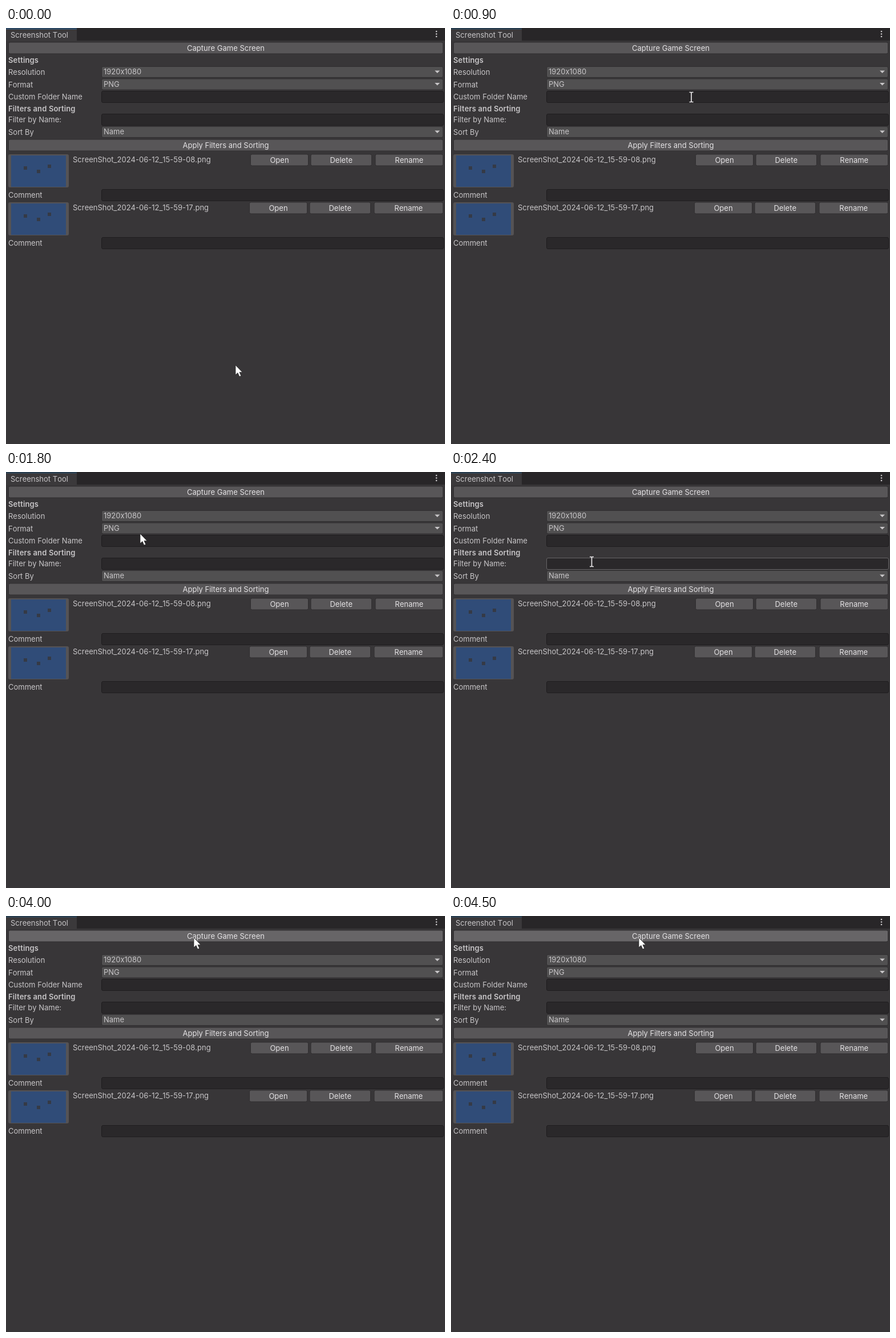
Animation of 769 by 728 pixels, one loop 5000 ms. Source, as an HTML page:

```html
<!DOCTYPE html>
<html lang="en">
<head>
<meta charset="utf-8">
<title>Screenshot Tool</title>
<style>
html, body { margin: 0; width: 100%; height: 100%; overflow: hidden; background: #383638; }
svg {
  display: block; font: 13px Inter, "Open Sans", sans-serif; fill: #c8c6c8;
  font-kerning: none; font-feature-settings: "calt" 0;
}
.button { fill: #585658; stroke: #302e30; }
.button.hover { fill: #676567; }
.button.pressed { fill: #46607c; }
.dropdown { fill: #515051; stroke: #302e30; }
.field { fill: #2a282a; stroke: #1f1d1f; }
.field.hover { stroke: #656365; }
.caption { fill: #e4e2e4; text-anchor: middle; }
.bold { font-weight: 600; letter-spacing: .15px; }
</style>
</head>
<body>
<svg id="stage" width="769" height="728" viewBox="0 0 769 728"></svg>
<script>
const stage = document.getElementById('stage');

function add(tag, attrs, text = '') {
  const node = document.createElementNS('http://www.w3.org/2000/svg', tag);
  for (const name in attrs) node.setAttribute(name, attrs[name]);
  node.textContent = text;
  return stage.appendChild(node);
}

const rect = (x, y, width, height, fill) => add('rect', { x, y, width, height, fill });
const box = (type, x, y, width, height) => add('rect',
  { class: type, x: x + .5, y: y + .5, width: width - 1, height: height - 1, rx: 2.5 });
const label = (x, middle, text, type = '') => add('text', { x, y: middle + 4.5, class: type }, text);

function button(x, y, width, text) {
  const node = box('button', x, y, width, 21);
  label(x + width / 2, y + 10.5, text, 'caption');
  return node;
}

function dropdown(y, name, value) {
  label(4, y + 10.5, name);
  box('dropdown', 167, y, 599, 20);
  label(171, y + 9.5, value);
  add('path', { d: `M751 ${y + 7.5}h9l-4.5 4.5z` });
}

function field(y, name) {
  label(4, y + 10.5, name);
  return box('field', 167, y, 600, 21);
}

function shot(y, x, file) {
  add('rect', { x: 4, y, width: 106, height: 58, rx: 3, fill: '#555355' });
  rect(9, y + 2, 96, 55, '#304c78');
  for (const [dx, dy] of [[31, 21], [54, 27], [73, 18]]) rect(dx, y + dy, 6, 6, '#353a46');
  label(117, y + 9, file);
  button(x, y - .5, 102, 'Open');
  button(x + 105.5, y - .5, 107.5, 'Delete');
  button(x + 218.5, y - .5, 547.5 - x, 'Rename');
  field(y + 61, 'Comment');
}

// Window tab
rect(0, 0, 769, 22, '#282628');
rect(0, 0, 124, 23, '#3b393b');
rect(0, 0, 124, 1, '#282628');
const tabLine = rect(0, 1, 124, 1);
label(8, 12, 'Screenshot Tool');
for (const cy of [6, 10.5, 15]) add('circle', { cx: 754, cy, r: 1.3 });

const capture = button(4, 24.5, 762, 'Capture Game Screen');
label(4, 56.5, 'Settings', 'bold');
dropdown(67, 'Resolution', '1920x1080');
dropdown(88.5, 'Format', 'PNG');
const folder = field(110, 'Custom Folder Name');
label(4, 141, 'Filters and Sorting', 'bold');
const filter = field(150, 'Filter by Name:');
dropdown(172, 'Sort By', 'Name');
button(4, 194.5, 762, 'Apply Filters and Sorting');
shot(221, 428, 'ScreenShot_2024-06-12_15-59-08.png');
shot(305, 426, 'ScreenShot_2024-06-12_15-59-17.png');

const arrow = add('path', {
  d: 'M0 0V17L4 13.5 6.8 20 9.8 18.7 7 12.4H12Z', fill: '#fff', stroke: '#222', 'stroke-width': .7
});
const beam = add('path', {
  d: 'M-3.5-8.5h2.5L0-7.5 1-8.5H3.5M0-7.5V7.5M-3.5 8.5h2.5L0 7.5 1 8.5H3.5',
  fill: 'none', stroke: '#e8e6e8', 'stroke-width': 1.7
});

// Pointer path: time, x, y
const path = [
  [0, 402, 590], [300, 455, 540], [600, 461, 400], [800, 432, 190], [900, 421, 121],
  [1000, 395, 116], [1200, 289, 48], [1500, 258, 80], [1800, 235, 108], [2000, 237, 125],
  [2300, 244, 155], [2400, 246.5, 157], [2500, 247, 168], [3000, 249, 176],
  [3400, 303, 40], [3500, 312, 36], [3700, 312, 36], [4000, 329, 38], [5000, 329, 38]
];

function pointer(time) {
  const i = path.findIndex(point => point[0] > time);
  const [t0, x0, y0] = path[i - 1], [t1, x1, y1] = path[i];
  const k = (time - t0) / (t1 - t0);
  return [x0 + (x1 - x0) * k, y0 + (y1 - y0) * k];
}

function target(y) {
  if (y >= 25 && y < 46) return capture;
  if (y >= 110 && y < 131) return folder;
  if (y >= 150 && y < 171) return filter;
}

function draw(now) {
  const time = Math.floor(now % 5000 / 100) * 100;
  const [x, y] = pointer(time);
  const over = target(y);
  // Highlights follow the pointer one step late
  const lit = target(pointer(Math.max(0, time - 100))[1]);
  for (const node of [capture, folder, filter]) node.classList.toggle('hover', node === over && node === lit);
  capture.classList.toggle('pressed', time >= 4300 && time < 4500);
  tabLine.setAttribute('fill', time < 100 ? '#3170a8' : '#24567a');

  const typing = over === folder || over === filter;
  for (const cursor of [arrow, beam]) {
    cursor.setAttribute('transform', `translate(${x} ${y})`);
    cursor.setAttribute('visibility', (cursor === beam) === typing ? 'visible' : 'hidden');
  }
}

const start = performance.now();
function tick() {
  draw(performance.now() - start);
  requestAnimationFrame(tick);
}
tick();
</script>
</body>
</html>
```
